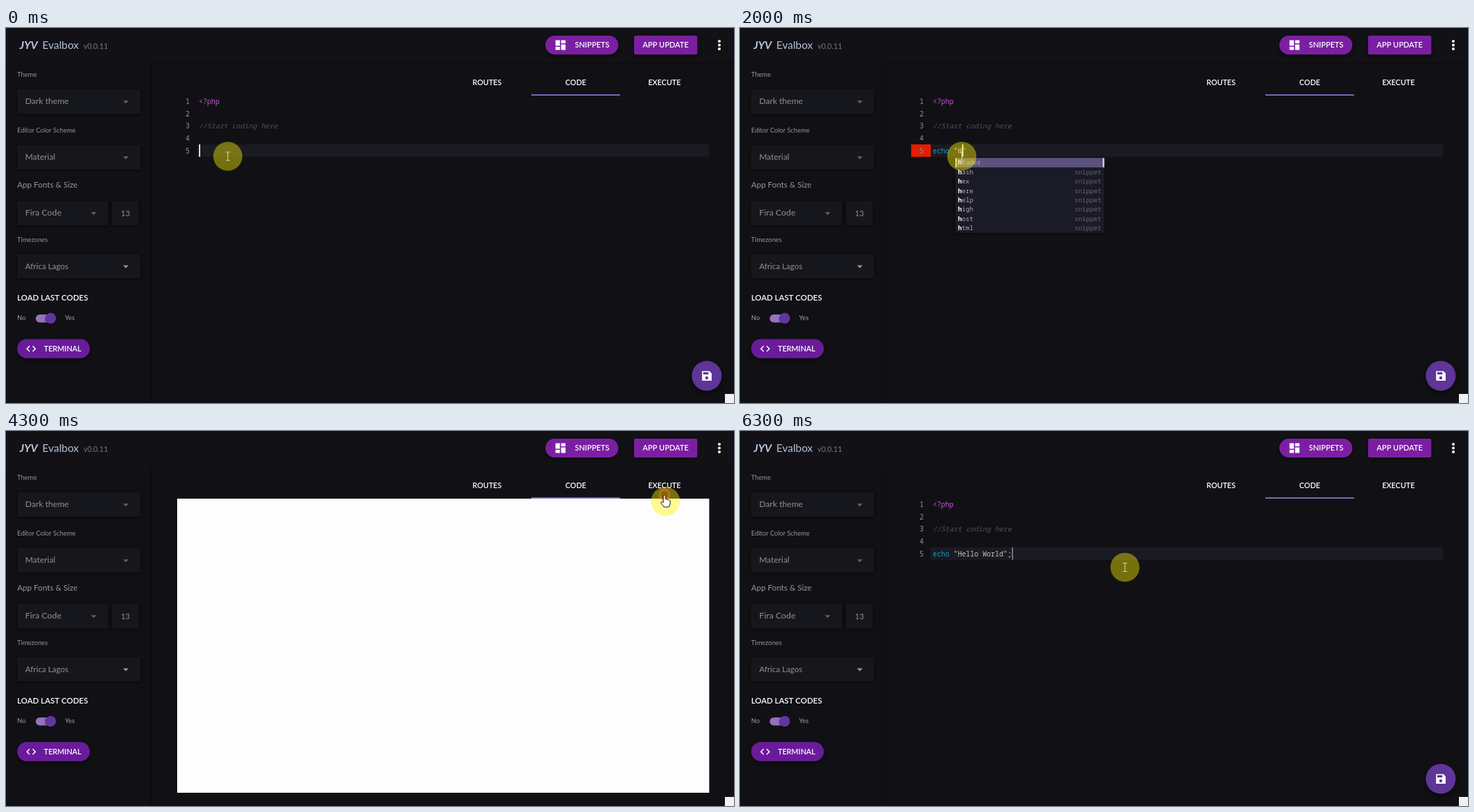
An HTML page with a canvas that plays this animation: 1042 px wide and 538 px high, repeating every 6400 ms.

```html
<!DOCTYPE html>
<html lang="en">
<head>
<meta charset="utf-8">
<title>Code editor</title>
<style>
html, body { margin: 0; width: 100%; height: 100%; overflow: hidden; background: #111115; }
canvas { display: block; }
</style>
</head>
<body>
<canvas id="stage" width="1042" height="538"></canvas>
<script>
const ctx = document.getElementById('stage').getContext('2d');
const LOOP = 6400;
const UI = 'Lato, sans-serif', MONO = '"Noto Sans Mono", monospace', DOC = '"Open Sans", sans-serif';
const CODE_X = 276, CHAR_W = 5.94, LINE_H = 17.55, CODE_SIZE = 9.9;

const DOCS = {
  echo: ['Output one or more strings. No parentheses are needed around the text.', 'echo "${1:string}";'],
  switch: ['switch ($${1:variable}) {', "\tcase '${2:value}':", '\t\t${3:// code...}', '\t\tbreak;',
    '\t${5}', '\tdefault:', '\t\t${4:// code...}', '\t\tbreak;', '}']
};

// [time, line text, caret column, caret opacity, completion prefix, completion words]
const TYPING = [
  [0, '', 0, 1],
  [200, 'e', 1, 1, 'e', 'echo else elseif exit end each eval extract'],
  [300, 'ec', 2, 1, 'ec', 'echo exec'],
  [400, 'ech', 3, 1, 'ech', 'echo'],
  [500, 'echo', 4, 1, 'echo', 'echo'],
  [700, 'echo', 4, 1],
  [800, 'echo ', 5, 1],
  [900, 'echo ""', 6, 1],
  [1300, 'echo ""', 6, 0],
  [1500, 'echo "G"', 7, 1, 'G', 'get global glob goto gets group'],
  [1700, 'echo ""', 6, 1],
  [2000, 'echo "H"', 7, 1, 'H', 'header hash hex here help high host html'],
  [2100, 'echo "He"', 8, 1, 'He', 'header hex here help'],
  [2200, 'echo "Hel"', 9, 1, 'Hel', 'help'],
  [2300, 'echo "Hell"', 10, 1],
  [2400, 'echo "Hello"', 11, 1],
  [2500, 'echo "Hello "', 12, 1],
  [2700, 'echo "Hello W"', 13, 1, 'W', 'switch wh'],
  [2800, 'echo "Hello Wo"', 14, 1],
  [2900, 'echo "Hello Worl"', 16, 1],
  [3000, 'echo "Hello World"', 17, 1],
  [3200, 'echo "Hello World"', 18, 1],
  [3500, 'echo "Hello World";', 19, 1],
  [3700, 'echo "Hello World";', 19, .45],
  [5400, 'echo "Hello World";', 19, 1],
  [6200, 'echo "Hello World";', 19, .7],
  [6300, 'echo "Hello World";', 19, .45]
];

// [time, x, y] of the pointer highlight
const POINTER = [[0, 317.5, 184], [3700, 317.5, 184], [4200, 944, 101], [4900, 944, 101],
  [5000, 918, 100], [5200, 814.5, 86], [5600, 814.5, 86], [5900, 551, 195.5], [LOOP, 551, 195.5]];

const lerp = (a, b, k) => a + (b - a) * k;
const clamp = k => Math.max(0, Math.min(1, k));
const smooth = k => k * k * (3 - 2 * k);

function rect(x, y, w, h, color, radius = 0) {
  ctx.fillStyle = color;
  ctx.beginPath();
  ctx.roundRect(x, y, w, h, radius);
  ctx.fill();
}

function disc(x, y, r, color) {
  ctx.fillStyle = color;
  ctx.beginPath();
  ctx.arc(x, y, r, 0, Math.PI * 2);
  ctx.fill();
}

function poly(points, color) {
  ctx.fillStyle = color;
  ctx.beginPath();
  points.forEach(([x, y]) => ctx.lineTo(x, y));
  ctx.fill();
}

function label(str, x, y, size, color, { font = UI, style = '', align = 'left' } = {}) {
  ctx.font = `${style} ${size}px ${font}`;
  ctx.fillStyle = color;
  ctx.textAlign = align;
  ctx.fillText(str, x, y);
}

const bold = (str, x, y, size = 10.8, align = 'left') =>
  label(str, x, y, size, '#fff', { style: '600', align });
const code = (str, col, row, color, style = '') =>
  label(str, CODE_X + col * CHAR_W, 109.3 + row * LINE_H, CODE_SIZE, color, { font: MONO, style });

function shadowed(blur, dy, draw) {
  ctx.save();
  ctx.shadowColor = 'rgba(0,0,0,.6)';
  ctx.shadowBlur = blur;
  ctx.shadowOffsetY = dy;
  draw();
  ctx.restore();
}

function select(str, x, y, w, h, size = 12, arrow = '#626267') {
  shadowed(4, 1, () => rect(x, y, w, h, '#16171c', 2));
  label(str, x + 11.5, y + 21, size, '#909095');
  const ax = x + w - 20.5, ay = y + h / 2 - 1.3;
  if (w > 50) poly([[ax - 4, ay], [ax + 4, ay], [ax, ay + 4]], arrow);
}

function drawHeader() {
  rect(0, 0, 1042, 50, '#121216');
  label('JYV', 19.5, 29.5, 15.6, '#bccbe2', { style: 'italic 700' });
  label('Evalbox', 52, 29.5, 15.4, '#b4c1d6');
  label('v0.0.11', 111, 29.5, 10.6, '#77787d');

  shadowed(5, 2, () => {
    rect(772, 11, 104.5, 27, '#7b1fa2', 13.5);
    rect(899, 11, 90.5, 27, '#7b1fa2', 2);
  });
  rect(786.5, 17.5, 6.3, 8, '#fff');
  rect(786.5, 27, 6.3, 4.5, '#fff');
  rect(794.5, 17.5, 6.3, 4.5, '#fff');
  rect(794.5, 23.5, 6.3, 8, '#fff');
  bold('SNIPPETS', 839, 27.8, 10.9, 'center');
  bold('APP UPDATE', 944.2, 27.8, 10.9, 'center');
  [19, 24.5, 30].forEach(y => disc(1021, y, 2, '#fff'));
}

function drawSidebar() {
  rect(207, 50, 2, 488, '#0d0d10');
  rect(209, 49, 833, 1.5, '#0d0d10');
  const caption = (str, y, size = 9.3) => label(str, 16, y, size, '#95959a');
  caption('Theme', 70.3);
  select('Dark theme', 16, 88, 176, 35, 12.1);
  caption('Editor Color Scheme', 150.3);
  select('Material', 16, 168, 176, 35, 11.9);
  caption('App Fonts & Size', 229.3, 11.6);
  select('Fira Code', 16, 248, 130, 35, 12.3);
  select('', 152, 248, 38, 35);
  label('13', 171, 270, 11, '#909095', { align: 'center' });
  caption('Timezones', 307.3);
  select('Africa Lagos', 16, 324.5, 176, 34.5, 11.5, '#9a9a9e');

  bold('LOAD LAST CODES', 16, 391, 11.4);
  label('No', 16, 419.4, 9.3, '#a0a0a5');
  label('Yes', 84.5, 419.4, 9.3, '#a0a0a5');
  rect(42.5, 411, 27, 11.5, '#9472bd', 5.7);
  shadowed(3, 1, () => disc(64, 416.5, 7.7, '#5f36a0'));

  shadowed(5, 2, () => rect(16, 446.3, 104, 27.5, '#6a1b9a', 13.7));
  ctx.strokeStyle = '#fff';
  ctx.lineWidth = 1.5;
  ctx.beginPath();
  for (const s of [-1, 1]) {
    ctx.moveTo(36 + s * 2.2, 456.3);
    ctx.lineTo(36 + s * 6, 460.2);
    ctx.lineTo(36 + s * 2.2, 464.1);
  }
  ctx.stroke();
  bold('TERMINAL', 81, 463.8, 10.7, 'center');
}

function drawTabs(t) {
  bold('ROUTES', 688.5, 81.8, 10.7, 'center');
  bold('CODE', 815.5, 81.8, 10.7, 'center');
  bold('EXECUTE', 942.5, 81.8, 10.7, 'center');
  const k = smooth(clamp((t - 4300) / 500)) - smooth(clamp((t - 5300) / 500));
  rect(752 + 127.5 * k, 95.3, 127, 1.8, '#8b73cc');
}

function drawDoc(word, x) {
  const lines = DOCS[word], step = 15.25;
  ctx.font = `10.7px ${DOC}`;
  const indent = line => line.lastIndexOf('\t') + 1;
  const width = Math.max(...lines.map(l => ctx.measureText(l.trim()).width + indent(l) * 25));
  shadowed(4, 1, () => rect(x, 186, width + 16, 41.5 + lines.length * step, '#2d2a41'));
  label(word, x + 8, 204.3, 10.7, '#e4e4ec', { font: DOC, style: '700' });
  rect(x + 8, 213.5, width, 1.6, '#d8d8e0');
  lines.forEach((l, i) =>
    label(l.trim(), x + 8 + indent(l) * 25, 232.8 + i * step, 10.7, '#d0d0da', { font: DOC }));
}

function drawPopup(caret, prefix, words) {
  const x = CODE_X + (caret - prefix.length) * CHAR_W - 3.3, w = 213, rowH = 13.4;
  const list = words.split(' ');
  shadowed(4, 1, () => rect(x, 186, w, list.length * rowH + .5, '#1b1b26'));
  rect(x, 186.5, w, rowH, '#5c517f');
  rect(x, 186.5, 1.8, rowH, '#e2e0ee');
  rect(x + w - 2, 186.5, 2, rowH, '#e2e0ee');
  list.forEach((word, row) => {
    const y = 196.4 + row * rowH;
    let matched = 0;
    [...word].forEach((c, i) => {
      const hit = c === (prefix[matched] || '').toLowerCase();
      if (hit) matched++;
      label(c, x + 3.6 + i * 5.5, y, 9.2, hit ? '#fff' : '#a9a7b6', { font: MONO, style: hit ? '700' : '' });
    });
    if (row) label('snippet', x + w - 4, y, 9.2, '#65636f', { font: MONO, align: 'right' });
  });
  if (DOCS[list[0]]) drawDoc(list[0], x + w + 1);
}

function drawEditor(t) {
  const [, line, caret, alpha, prefix, words] = TYPING.findLast(s => s[0] <= t);
  rect(273, 167, 733.5, 17.8, '#1a1a23');
  if (t >= 200 && t < 3700) rect(245, 167, 28, 17.8, '#e71c02');
  for (let i = 0; i < 5; i++)
    label(i + 1, 263, 109.3 + i * LINE_H, CODE_SIZE, '#929297', { font: MONO, align: 'right' });
  code('<?php', 0, 0, '#c25bd0');
  code('//Start coding here', 0, 2, '#515154', 'italic');
  code(line.slice(0, 4), 0, 4, '#0f9fcc');
  code(line.slice(5, 18), 5, 4, '#c8c9a6');
  code(line.slice(18), 18, 4, '#c4c4d2');
  rect(CODE_X + caret * CHAR_W + .3, 167, 1.7, 17.8, `rgba(255,255,255,${alpha})`);
  if (words) drawPopup(caret, prefix, words);
}

function drawSaveButton() {
  shadowed(7, 3, () => disc(1003, 499, 21.4, '#5f3597'));
  poly([[996.3, 492.2], [1006.8, 492.2], [1010, 495.4], [1010, 506], [996.3, 506]], '#fff');
  rect(998, 493.8, 7.4, 3.2, '#5f3597');
  disc(1003, 502, 2.2, '#5f3597');
}

function drawOutput(t) {
  rect(245, 97, 761.5, 422, '#fdfdfd');
  if (t >= 4700) label('Hello World', 271, 144, 11.4, '#222');
}

function pointerAt(t) {
  const i = POINTER.findIndex(p => p[0] > t);
  const [t0, x0, y0] = POINTER[i - 1], [t1, x1, y1] = POINTER[i];
  const k = (t - t0) / (t1 - t0), e = t1 - t0 > 200 ? smooth(k) : k;
  return [lerp(x0, x1, e), lerp(y0, y1, e)];
}

function drawHand(x, y) {
  ctx.save();
  ctx.translate(x, y);
  ctx.beginPath();
  ctx.moveTo(-1.5, 10);
  ctx.lineTo(-1.5, 1);
  ctx.quadraticCurveTo(0, -1, 1.5, 1);
  ctx.lineTo(1.5, 6);
  ctx.quadraticCurveTo(3.5, 5, 4.2, 6.7);
  ctx.quadraticCurveTo(6, 6, 6.5, 7.4);
  ctx.quadraticCurveTo(8.2, 7, 8.4, 9);
  ctx.quadraticCurveTo(8.6, 13, 6.3, 17);
  ctx.lineTo(-.8, 17);
  ctx.quadraticCurveTo(-3, 13.5, -5, 11);
  ctx.quadraticCurveTo(-4.5, 8.5, -1.5, 10.5);
  ctx.closePath();
  ctx.fillStyle = '#fff';
  ctx.fill();
  ctx.strokeStyle = '#15151a';
  ctx.lineWidth = 1;
  ctx.stroke();
  ctx.restore();
}

function drawBeam(x, y) {
  ctx.strokeStyle = '#d5d5c4';
  ctx.lineWidth = 1;
  ctx.beginPath();
  ctx.moveTo(x, y - 5.5);
  ctx.lineTo(x, y + 5.5);
  for (const s of [-6, 6]) {
    ctx.moveTo(x - 2.8, y + s);
    ctx.lineTo(x + 2.8, y + s);
  }
  ctx.stroke();
}

function drawPointer(t) {
  const [x, y] = pointerAt(t);
  disc(x, y, 20.8, 'rgba(255,243,0,.42)');
  const tipX = x - 1.5, tipY = y - 9;
  for (const click of [4300, 5400]) {
    const age = (t - click) / 100;
    if (age < 0 || age > 2) continue;
    ctx.strokeStyle = `rgba(245,105,20,${1 - age * .35})`;
    ctx.lineWidth = 2;
    ctx.beginPath();
    ctx.arc(tipX, tipY - .7, 7 + age * 4, 0, Math.PI * 2);
    ctx.stroke();
  }
  if (t >= 4100 && t < 5700) drawHand(tipX, tipY);
  else drawBeam(x, y);
}

function render(now) {
  const t = Math.floor((now % LOOP) / 100) * 100;
  const output = t >= 4300 && t < 5400;
  rect(0, 0, 1042, 538, '#111115');
  drawHeader();
  drawSidebar();
  if (output) drawOutput(t);
  else {
    drawEditor(t);
    drawSaveButton();
  }
  drawTabs(t);
  rect(1029, 525, 13, 13, '#f1f1f1');
  drawPointer(t);
}

const start = performance.now();
function tick() {
  render(performance.now() - start);
  requestAnimationFrame(tick);
}
tick();
</script>
</body>
</html>
```
